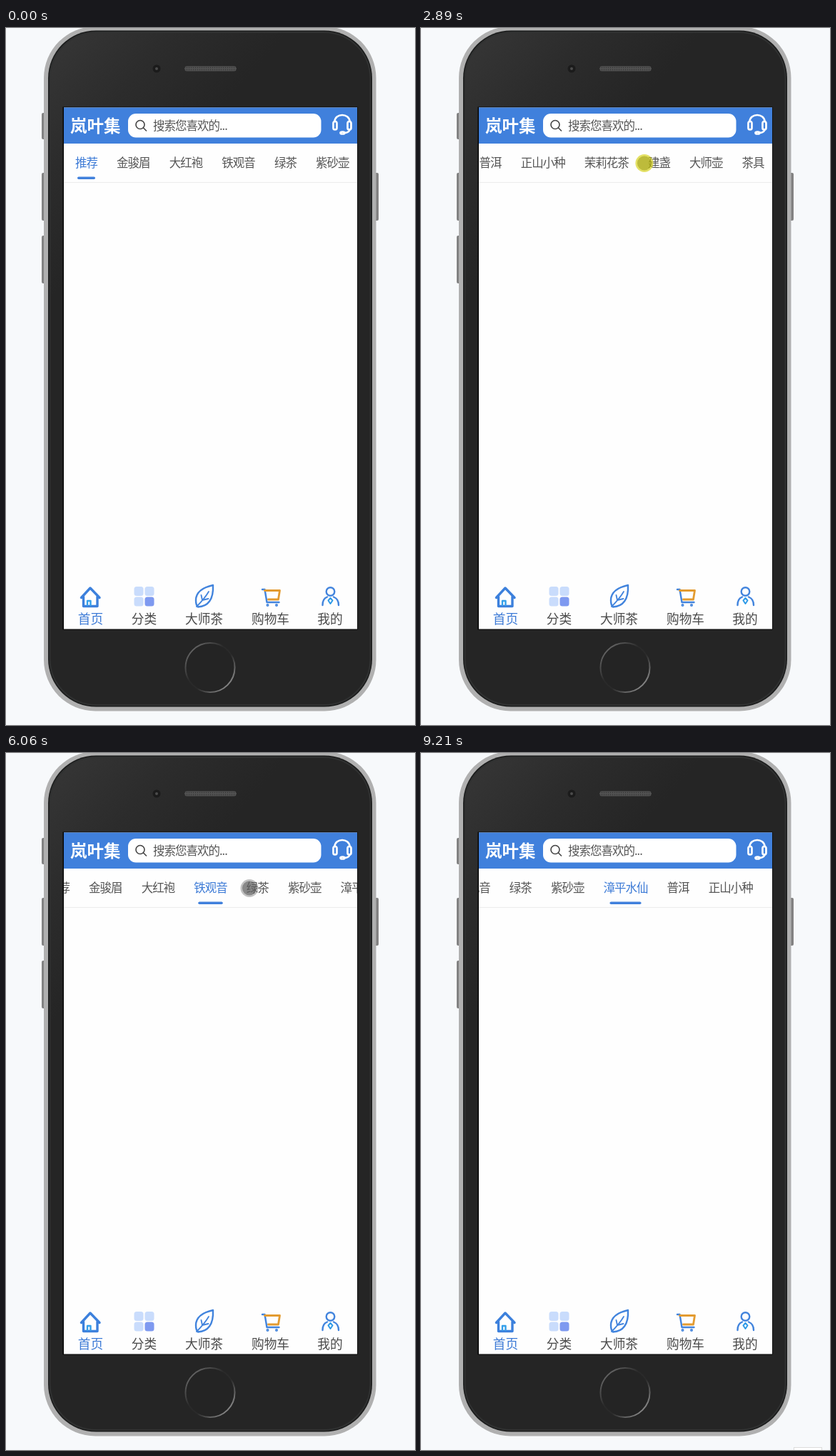
Recreate the animation shown at these times as an HTML page. Size 573x977 px, loop 9.28 s.

```html
<!DOCTYPE html>
<html lang="zh-CN">
<head>
<meta charset="utf-8">
<title>Tea shop tabs</title>
<style>
  html, body { margin: 0; width: 100%; height: 100%; overflow: hidden; background: #f7f9fb; }
  svg { display: block; width: 100%; height: 100%; }
  text { font-family: "Noto Sans CJK SC", "Noto Sans CJK", sans-serif; fill: #4a4a4a; }
  .tab { font-size: 16.5px; letter-spacing: -1px; fill: #555; }
  .nav { font-size: 17.7px; text-anchor: middle; }
  .tab.on, .nav.on { fill: #3c7ad6; }
  .line { fill: none; stroke: #4284dd; stroke-width: 2.4; stroke-linecap: round; stroke-linejoin: round; }
</style>
</head>
<body>
<svg viewBox="0 0 573 977">
  <defs>
    <linearGradient id="shell" gradientUnits="userSpaceOnUse" x1="70" y1="10" x2="250" y2="170">
      <stop offset="0" stop-color="#363636"/>
      <stop offset=".5" stop-color="#2c2c2c"/>
      <stop offset="1" stop-color="#252525"/>
    </linearGradient>
    <linearGradient id="ring" x1=".1" y1=".1" x2=".9" y2=".9">
      <stop offset="0" stop-color="#6a6a6a"/>
      <stop offset=".4" stop-color="#2a2a2a"/>
      <stop offset=".6" stop-color="#2a2a2a"/>
      <stop offset="1" stop-color="#929292"/>
    </linearGradient>
    <pattern id="mesh" width="3" height="3" patternUnits="userSpaceOnUse">
      <rect width="3" height="3" fill="#525252"/>
      <circle cx="1.5" cy="1.5" r=".8" fill="#343434"/>
    </pattern>
    <clipPath id="tabArea"><rect x="81" y="162" width="411" height="54"/></clipPath>
  </defs>

  <!-- phone -->
  <g fill="#828282">
    <rect x="50" y="119" width="6" height="37" rx="2"/>
    <rect x="50" y="203" width="6" height="67" rx="2"/>
    <rect x="50" y="291" width="6" height="67" rx="2"/>
    <rect x="515" y="203" width="7" height="67" rx="2"/>
  </g>
  <rect x="53" y="-2" width="465.5" height="959.5" rx="72" fill="#b0b0b0"/>
  <rect x="59" y="3.5" width="454" height="948" rx="67" fill="#1b1c1c"/>
  <rect x="61.5" y="6" width="449" height="943" rx="65" fill="url(#shell)" stroke="#303131" stroke-width="2"/>
  <rect x="250" y="53.5" width="73" height="7" rx="3.5" fill="url(#mesh)"/>
  <circle cx="211" cy="57" r="5.5" fill="#1b1b1b"/>
  <circle cx="211" cy="57" r="2" fill="#4c4c4c"/>
  <circle cx="286" cy="896.5" r="34.5" fill="#242424" stroke="url(#ring)" stroke-width="2"/>
  <rect x="79.5" y="110.5" width="413" height="733" fill="#060606"/>
  <rect x="81" y="111.5" width="411" height="731" fill="#fefefe"/>

  <!-- header -->
  <rect x="81" y="111.5" width="411" height="50.5" fill="#4080dc"/>
  <text x="90" y="145.5" font-size="23.5" font-weight="900" style="fill:#fff">岚叶集</text>
  <rect x="171" y="120" width="270.5" height="33.5" rx="11" fill="#fff"/>
  <g class="line" style="stroke:#444;stroke-width:1.6"><circle cx="188" cy="135.5" r="6"/><path d="M192.5 140l4 4"/></g>
  <text class="tab" x="206" y="143">搜索您喜欢的...</text>
  <g class="line" style="stroke:#fff;stroke-width:2.7">
    <path d="M460.5 131C461 119 481 119 481.5 131M481.5 143C480 146 477 147 474 147"/>
    <rect x="458.5" y="131" width="5" height="11.5" rx="2.5"/>
    <rect x="478.5" y="131" width="5" height="11.5" rx="2.5"/>
    <ellipse cx="471.5" cy="147" rx="3" ry="1.5"/>
  </g>

  <!-- category tabs -->
  <path d="M81 216.5H492" stroke="#ececec"/>
  <g clip-path="url(#tabArea)">
    <g id="tabs"><rect id="bar" y="208.5" height="3.5" rx="1.75" fill="#4080dc"/></g>
  </g>

  <!-- bottom navigation -->
  <g class="line" style="stroke-width:3.4;stroke:#3c80dc">
    <path d="M105.5 798.5L118 785l13 13.5M108.5 797v13.5h19.5V797"/>
    <path d="M114 809v-6h4.5v6" style="stroke:#35a0ea;stroke-width:2.4"/>
  </g>
  <g fill="#c9dcfc">
    <rect x="179.5" y="783" width="13" height="13" rx="3.5"/>
    <rect x="194.5" y="783" width="13" height="13" rx="3.5"/>
    <rect x="179.5" y="797.5" width="13" height="13" rx="3.5"/>
    <rect x="194.5" y="797.5" width="13" height="13" rx="3.5" fill="#7e99f0"/>
  </g>
  <g class="line">
    <path d="M290 781C276 784 266 791 266 802C266 807 267 810 269 811.5C283 811 291 801 290 781Z"/>
    <path d="M267 811C273 805 280 797 284 790M275 802l-1.5-7M275 802l8.5-2" stroke-width="1.8"/>
  </g>
  <g class="line">
    <path d="M359 787h3.5l3 18h17"/>
    <path d="M362.5 788.5h21l-2 12.5h-14" style="stroke:#e39b30;stroke-width:2.8"/>
    <circle cx="366.5" cy="809" r=".8"/><circle cx="379" cy="809" r=".8"/>
  </g>
  <g class="line">
    <circle cx="454.5" cy="790" r="5.8"/>
    <path d="M443.5 809C443.5 802 446 799 450 797.5M466 809C466 802 463 799 459 797.5"/>
    <path d="M454.5 799l3 3.5-3 4.5-3-4.5Z" style="stroke:#2f9be8;stroke-width:2"/>
  </g>
  <text class="nav on" x="118.5" y="834.5">首页</text>
  <text class="nav" x="193.5" y="834.5">分类</text>
  <text class="nav" x="277.5" y="834.5">大师茶</text>
  <text class="nav" x="370.5" y="834.5">购物车</text>
  <text class="nav" x="454" y="834.5">我的</text>

  <g id="cursor">
    <circle id="halo" r="12.5"/>
    <circle id="core" r="10"/>
  </g>
  <rect id="tip" x="522.5" y="973.5" width="39" height="6" fill="#fff" stroke="#dcdcdc"/>
</svg>
<script>
const LOOP = 9280, ENTER = 70, LEAVE = 8230;
const SLIDE = 300, GLIDE = 350;
const CHAR = 15.5, GAP = 27.1, MAX_SCROLL = 519, MIDDLE = 286.5;
const ROW = 189.5, SWAY = 16;

const $ = id => document.getElementById(id);
const mix = (a, b, k) => a + (b - a) * k;
const clamp = (v, low, high) => Math.min(high, Math.max(low, v));
const progress = (t, start, length) => clamp((t - start) / length, 0, 1);
const easeOut = k => 1 - (1 - k) ** 2;
const smooth = k => k * k * (3 - 2 * k);

let nextX = 97;
const tabs = '推荐 金骏眉 大红袍 铁观音 绿茶 紫砂壶 漳平水仙 普洱 正山小种 茉莉花茶 建盏 大师壶 茶具'
  .split(' ').map(label => {
    const el = document.createElementNS('http://www.w3.org/2000/svg', 'text');
    el.textContent = label;
    el.setAttribute('x', nextX);
    el.setAttribute('y', 195);
    el.classList.add('tab');
    $('tabs').append(el);
    const width = CHAR * label.length;
    const center = nextX + width / 2;
    nextX += width + GAP;
    return { el, center, bar: 6 + 9.5 * label.length, scroll: Math.max(0, center - MIDDLE) };
  });

// Each drag scrolls by its distance, then glides on after release
const drags = [
  { start: 860, end: 1250, from: 280, to: 94, glide: 114 },
  { start: 1750, end: 2050, from: 390, to: 75, glide: 0 },
  { start: 2885, end: 3250, from: 309, to: 547, glide: -281 }
];

// Each click selects the following tab
const clicks = [
  { time: 4530, x: 182 }, { time: 5050, x: 252 }, { time: 5650, x: 328 },
  { time: 6150, x: 341 }, { time: 6905, x: 350 }, { time: 7490, x: 395 }
];

const stops = [
  { t: ENTER, x: 544, y: 932 },
  { t: 540, x: 231, y: 205 },
  ...drags.flatMap(d => [{ t: d.start, x: d.from, y: ROW, drag: true }, { t: d.end, x: d.to, y: ROW }]),
  ...clicks.flatMap(({ time, x }) => [{ t: time - 90, x, y: ROW }, { t: time + 50, x, y: ROW }]),
  { t: LEAVE, x: 590, y: 522 }
];

function pointerAt(t) {
  const i = clamp(stops.findIndex(stop => stop.t > t), 1, stops.length - 1);
  const a = stops[i - 1], b = stops[i];
  const k = progress(t, a.t, b.t - a.t);
  const eased = a.drag ? k : smooth(k);
  const sway = a.drag || a.x === b.x ? 0 : SWAY * Math.sin(Math.PI * k);
  return { x: mix(a.x, b.x, eased), y: mix(a.y, b.y, eased) + sway };
}

function draggedScroll(t) {
  return drags.filter(d => t >= d.start).reduce((scroll, d) => {
    const moved = (d.from - d.to) * progress(t, d.start, d.end - d.start);
    const glided = d.glide * easeOut(progress(t, d.end, GLIDE));
    return clamp(scroll + moved + glided, 0, MAX_SCROLL);
  }, 0);
}

function draw(t) {
  const active = clicks.filter(click => click.time <= t).length;
  const tab = tabs[active], previous = tabs[Math.max(0, active - 1)];
  const k = active ? progress(t, clicks[active - 1].time, SLIDE) : 1;
  const scroll = active ? mix(previous.scroll, tab.scroll, smooth(k)) : draggedScroll(t);
  const barWidth = mix(previous.bar, tab.bar, easeOut(k));

  $('tabs').setAttribute('transform', `translate(${-scroll})`);
  $('bar').setAttribute('width', barWidth);
  $('bar').setAttribute('x', mix(previous.center, tab.center, easeOut(k)) - barWidth / 2);
  tabs.forEach((item, i) => item.el.classList.toggle('on', i === active));

  const pressed = drags.some(d => t >= d.start && t < d.end)
    || clicks.some(click => Math.abs(t - click.time) < 50);
  const { x, y } = pointerAt(t);
  $('cursor').style.display = t >= ENTER && t < LEAVE ? '' : 'none';
  $('cursor').setAttribute('transform', `translate(${x} ${y})`);
  $('halo').setAttribute('fill', pressed ? 'rgba(210,205,0,.6)' : 'rgba(120,120,120,.45)');
  $('core').setAttribute('fill', pressed ? 'rgba(150,150,15,.5)' : 'rgba(80,80,80,.5)');
  $('tip').style.display = t >= 9210 ? '' : 'none';
}

const start = performance.now();
function frame() {
  draw((performance.now() - start) % LOOP);
  requestAnimationFrame(frame);
}
frame();
</script>
</body>
</html>
```
